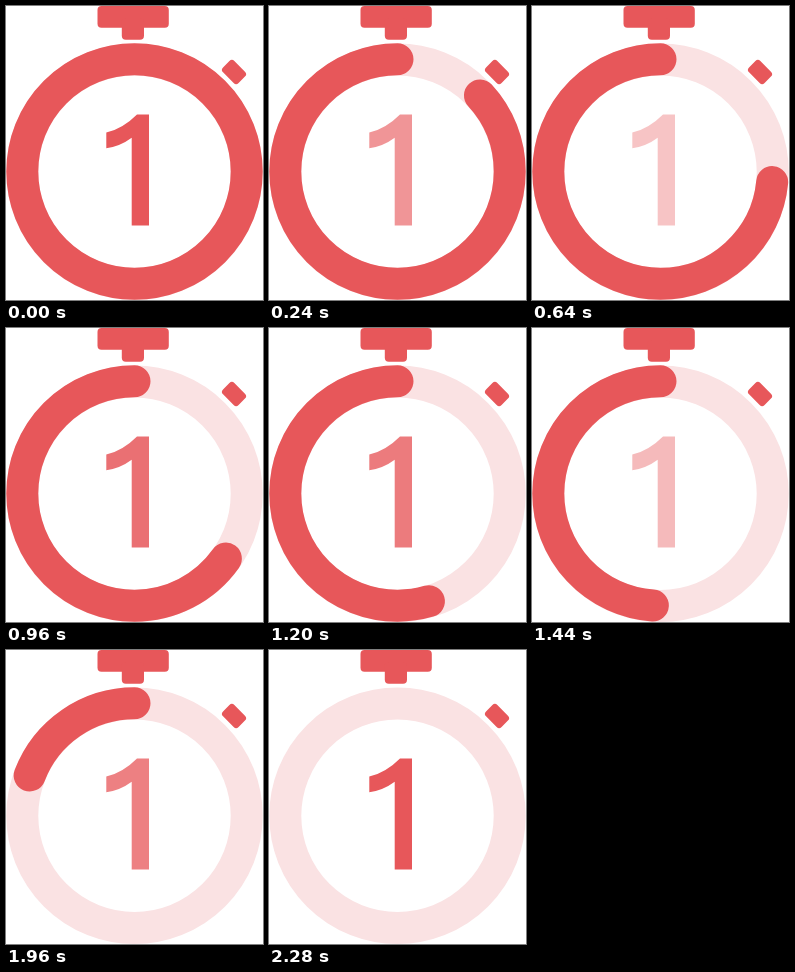
These frames come from a looping animation (257x294 px, 2.6 s). An HTML page:

```html
<!DOCTYPE html>
<html lang="en">
<head>
<meta charset="utf-8">
<title>Stopwatch</title>
<style>
  html, body { margin: 0; width: 100%; height: 100%; overflow: hidden; background: #fff; }
  svg { display: block; width: 257px; height: 294px; fill: #e7575a; }
  circle { fill: none; stroke: #e7575a; stroke-width: 32; }
  .track { stroke: #fae2e3; }
</style>
</head>
<body>
<svg viewBox="0 0 257 294">
  <rect x="91.5" width="71.3" height="21.8" rx="4"/>
  <rect x="115.8" y="12" width="22.2" height="21.8" rx="4"/>
  <rect x="-11" y="-8" width="22" height="16" rx="3.5" transform="translate(228 66) rotate(45)"/>
  <circle class="track" cx="128.5" cy="165.8" r="112.2"/>
  <!-- Mirrored so the stroke begins at the top and runs counterclockwise -->
  <circle id="arc" r="112.2" pathLength="360" stroke-linecap="round"
    transform="translate(128.5 165.5) scale(-1 1) rotate(-90)"/>
  <path id="digit" d="M143 108.4V219.5H125.7V131.8Q114 140.5 100.3 142.3V126.5Q117 122.5 131 108.4Z"/>
</svg>
<script>
  const LOOP = 2600, END = 2120, GONE = 2280, HALF = END / 4;
  const arc = document.getElementById('arc');
  const digit = document.getElementById('digit');

  // [time in ms, degrees emptied clockwise from the top]
  const keys = [
    [0, 0], [240, 47.3], [400, 72], [640, 95.5], [800, 108], [960, 125.5],
    [1120, 157], [1440, 184], [1560, 202], [1680, 223], [1760, 232.5],
    [1920, 274], [END, 358.5]
  ];

  function emptied(t) {
    const i = Math.max(1, keys.findIndex(k => k[0] >= t));
    const [t0, a0] = keys[i - 1], [t1, a1] = keys[i];
    return a0 + (a1 - a0) * (t - t0) / (t1 - t0);
  }

  function draw(now) {
    const time = now % LOOP;
    const step = time < 160 || time >= 1920 ? 40 : 80;
    const t = Math.min(END, Math.floor(time / step) * step);
    arc.style.visibility = time < GONE ? 'visible' : 'hidden';
    arc.setAttribute('stroke-dasharray', `${360 - emptied(t)} 360`);
    // Triangle wave: two blinks per loop
    const fade = Math.abs(t % (2 * HALF) - HALF) / HALF;
    digit.setAttribute('opacity', 0.18 + 0.82 * fade);
  }

  const start = performance.now();
  function tick() {
    draw(performance.now() - start);
    requestAnimationFrame(tick);
  }
  tick();
</script>
</body>
</html>
```
